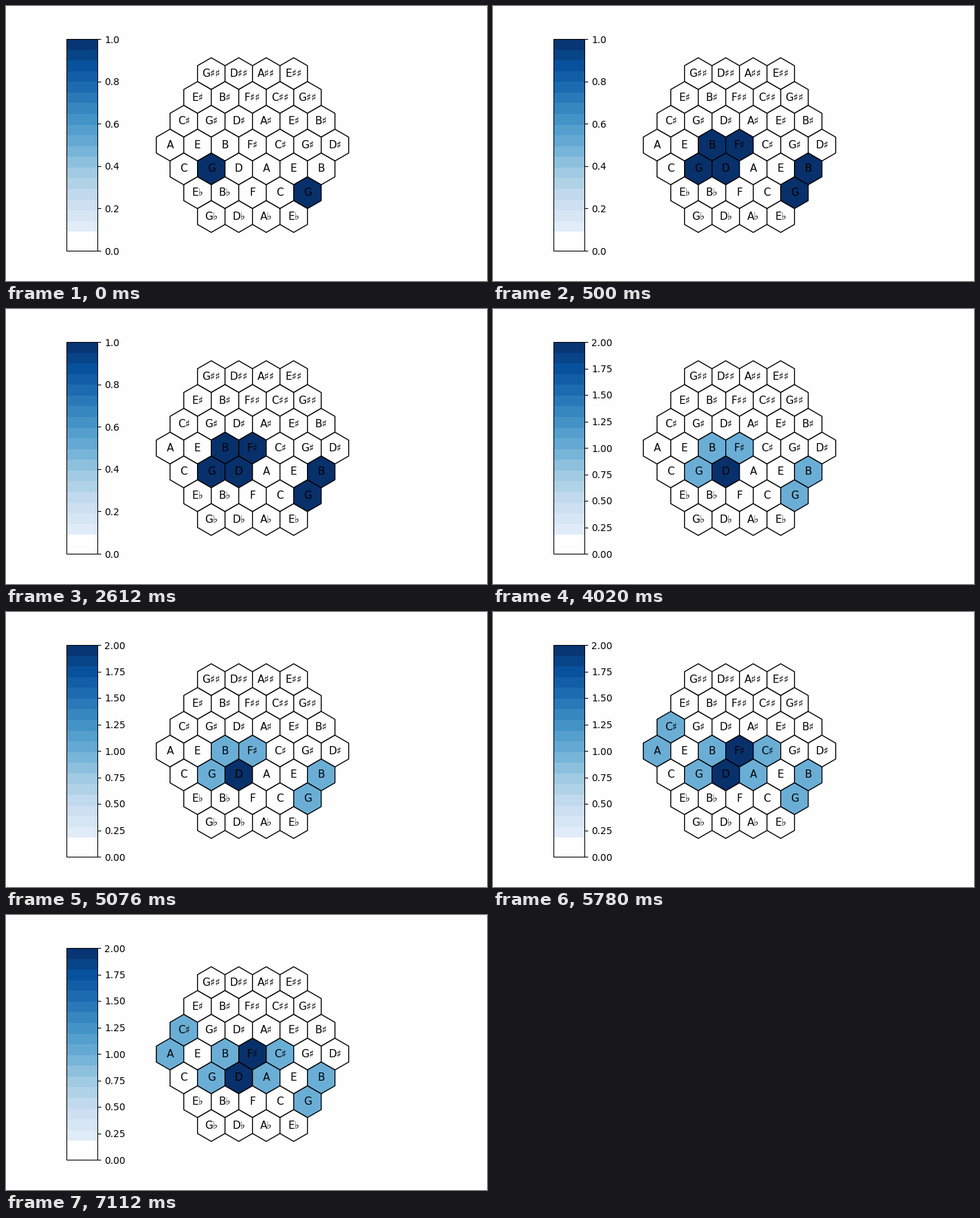
Recreate the animation shown at these times as a matplotlib script. Size 700 px wide and 400 px high, loop 8 s.

```python
import numpy as np
import matplotlib.pyplot as plt
from matplotlib.collections import PolyCollection
from matplotlib.colors import ListedColormap
from matplotlib.animation import FuncAnimation
from matplotlib.markers import TICKRIGHT
from matplotlib.patches import Rectangle

W, H, DPI = 700, 400, 100
STEP, LOOP = 20, 8000  # ms
PAPER = "#fefefe"

# time in ms at which notes sound; every note raises its count by one
EVENTS = [(0, "G"), (500, "B D F♯"), (4020, "D"), (5780, "F♯ A C♯")]

SIDE = 4  # cells along each edge of the grid
CENTER = (358.7, 202.3)
PITCH = 40
RADIUS = PITCH / np.sqrt(3)

BAR_LEFT, BAR_RIGHT = 87.5, 133
BAR_TOP, BAR_BOTTOM = 48, 356
BANDS, BLANK = 18, 0.09

blues = plt.get_cmap("Blues")

plt.rcParams["font.family"] = "DejaVu Sans"
fig = plt.figure(figsize=(W / DPI, H / DPI), dpi=DPI, facecolor=PAPER)
ax = fig.add_axes([0, 0, 1, 1])
ax.axis("off")


def bar_y(share):
    return BAR_BOTTOM - share * (BAR_BOTTOM - BAR_TOP)


def note_name(fifths):
    """Name a note by its place on the line of fifths, F being zero."""
    accidentals, letter = divmod(fifths, 7)
    mark = "♯" if accidentals > 0 else "♭"
    return "FCGDAEB"[letter] + mark * abs(accidentals)


def draw_bar():
    edges = np.linspace(BLANK, 1, BANDS + 1)
    colors = blues((edges[:-1] + edges[1:]) / 2)
    ax.pcolormesh([BAR_LEFT, BAR_RIGHT], bar_y(edges),
                  np.arange(BANDS)[:, None], cmap=ListedColormap(colors))
    ax.add_patch(Rectangle((BAR_LEFT, BAR_TOP), BAR_RIGHT - BAR_LEFT,
                           BAR_BOTTOM - BAR_TOP, fill=False, ec="black", lw=0.8))


def draw_grid():
    angles = np.radians(np.arange(30, 390, 60))
    corners = RADIUS * np.column_stack([np.cos(angles), np.sin(angles)])
    names, hexes = [], []
    for row in range(1 - SIDE, SIDE):
        count = 2 * SIDE - 1 - abs(row)
        # up-left is a major third (4 fifths), down-right a minor one (-3)
        first = 4 - (4 if row < 0 else 3) * row
        y = CENTER[1] + row * RADIUS * 1.5
        for col in range(count):
            x = CENTER[0] + (col - (count - 1) / 2) * PITCH
            names.append(note_name(first + col))
            hexes.append(corners + (x, y))
            ax.text(x, y, names[-1], fontsize=11, ha="center", va="center")
    cells = PolyCollection(hexes, edgecolors="black", linewidths=1,
                           joinstyle="miter", zorder=2)
    ax.add_collection(cells, autolim=False)
    return names, cells


draw_bar()
names, cells = draw_grid()
ticks, = ax.plot([], [], ls="", marker=TICKRIGHT, ms=3.5, mew=0.8, color="black")
tick_labels = [ax.text(BAR_RIGHT + 10.5, 0, "", fontsize=10,
                       va="center_baseline") for _ in range(9)]
ax.set_xlim(0, W)
ax.set_ylim(H, 0)


def update(i):
    played = [n for t, notes in EVENTS if t <= i * STEP for n in notes.split()]
    counts = [played.count(name) for name in names]
    top = max(counts)
    cells.set_facecolor([blues(n / top) if n else PAPER for n in counts])

    parts, digits = (5, 1) if top == 1 else (8, 2)
    shares = np.linspace(0, 1, parts + 1)
    ticks.set_data(np.full(parts + 1, BAR_RIGHT), bar_y(shares))
    for k, label in enumerate(tick_labels):
        share = k / parts
        label.set_y(bar_y(share))
        label.set_text(f"{share * top:.{digits}f}" if k <= parts else "")
    return [cells, ticks, *tick_labels]


anim = FuncAnimation(fig, update, frames=LOOP // STEP, interval=STEP,
                     repeat=True, repeat_delay=0)
plt.show()
```
